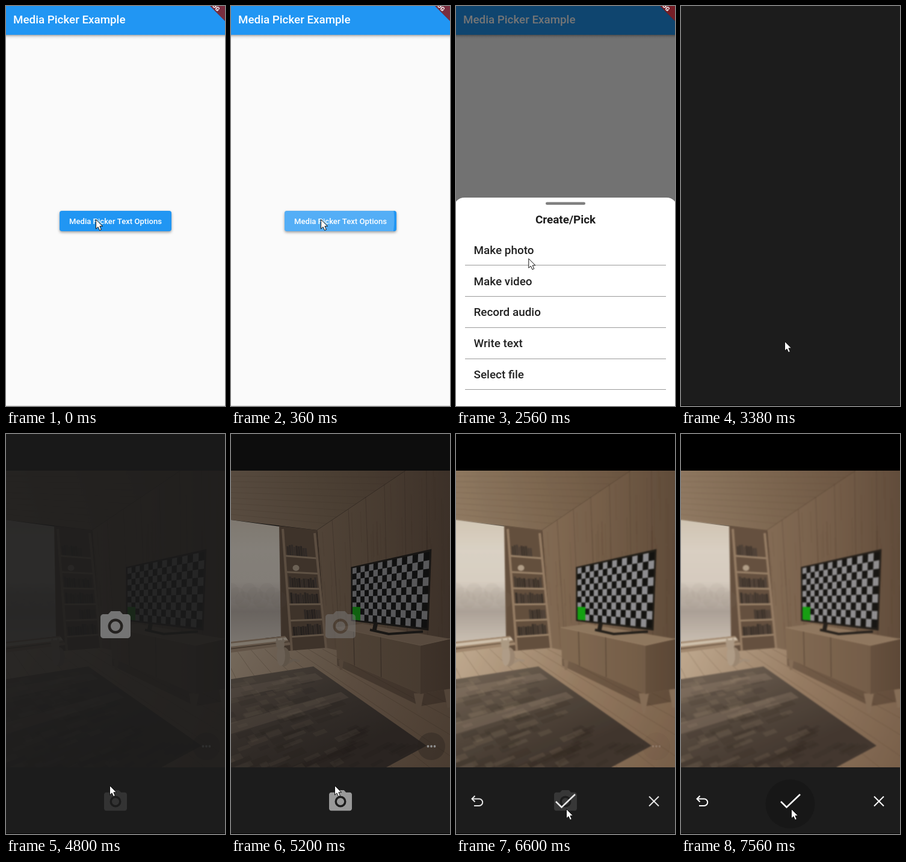
An HTML page with a canvas for the animation above (8 s loop, 364 by 666 pixels).

```html
<!DOCTYPE html>
<html lang="en">
<head>
<meta charset="utf-8">
<title>Media Picker Example</title>
<style>
html, body { margin: 0; width: 100%; height: 100%; overflow: hidden; background: #fafafa; }
canvas { display: block; }
</style>
</head>
<body>
<canvas id="stage" width="364" height="666"></canvas>
<script>
const W = 364, H = 666, LOOP = 8000;
const PHOTO_TOP = 61, PHOTO_BOTTOM = 555, PHOTO_HEIGHT = PHOTO_BOTTOM - PHOTO_TOP;
const stage = document.getElementById('stage').getContext('2d');

const mix = (a, b, p) => a + (b - a) * p;
const ramp = (t, from, to) => Math.min(1, Math.max(0, (t - from) / (to - from)));
const easeOut = p => 1 - (1 - p) ** 2;
const easeInOut = p => p * p * (3 - 2 * p);

function trace(c, points) {
  c.beginPath();
  for (const [x, y] of points) c.lineTo(x, y);
}
function fill(c, color, ...points) {
  trace(c, points);
  c.fillStyle = color;
  c.fill();
}
function line(c, color, width, ...points) {
  trace(c, points);
  c.strokeStyle = color;
  c.lineWidth = width;
  c.stroke();
}
function ellipse(c, color, x, y, rx, ry = rx) {
  c.beginPath();
  c.ellipse(x, y, rx, ry, 0, 0, 7);
  c.fillStyle = color;
  c.fill();
}
function rounded(c, color, x, y, w, h, r) {
  c.beginPath();
  c.roundRect(x, y, w, h, r);
  c.fillStyle = color;
  c.fill();
}
function rect(c, color, x, y, w, h) {
  c.fillStyle = color;
  c.fillRect(x, y, w, h);
}
function gradient(c, x0, y0, x1, y1, ...colors) {
  const g = c.createLinearGradient(x0, y0, x1, y1);
  colors.forEach((color, i) => g.addColorStop(i / (colors.length - 1), color));
  return g;
}
function text(c, str, x, y, size, weight, color, align = 'left') {
  c.font = `${weight} ${size}px Roboto, sans-serif`;
  c.textAlign = align;
  c.fillStyle = color;
  c.fillText(str, x, y);
}
function withAlpha(alpha, draw) {
  if (alpha <= 0) return;
  stage.save();
  stage.globalAlpha = alpha;
  draw();
  stage.restore();
}

// Maps (u, v) in the unit square onto a surface with four corners;
// depth > 1 makes the left side recede.
function plane(tl, tr, br, bl, depth = 1) {
  return (u, v) => {
    const p = u / (depth + (1 - depth) * u);
    return [0, 1].map(k => mix(mix(tl[k], tr[k], p), mix(bl[k], br[k], p), v));
  };
}
function patch(c, color, at, u0 = 0, v0 = 0, u1 = 1, v1 = 1) {
  fill(c, color, at(u0, v0), at(u1, v0), at(u1, v1), at(u0, v1));
}

// The room seen by the camera, painted once
function paintRoom() {
  const canvas = document.createElement('canvas');
  canvas.width = W;
  canvas.height = H;
  const c = canvas.getContext('2d');
  let seed = 11;
  const rnd = (a, b) => (seed = seed * 16807 % 2147483647, a + (b - a) * seed / 2147483647);
  const cornerTop = [143, 160], cornerBottom = [158, 356];
  c.beginPath();
  c.rect(0, PHOTO_TOP, W, PHOTO_HEIGHT);
  c.clip();

  // Floor boards
  rect(c, gradient(c, 0, 360, W, 540, '#c9b196', '#997c62', '#785d47'), 0, 340, W, 220);
  for (let i = 0; i < 10; i++) line(c, 'rgba(65,43,28,.28)', 1, [i * 24 - 40, 358], [i * 62 + 20, 555]);

  // Walls and ceiling, with boards and grain
  const wall = plane(cornerTop, [W, 11], [W, 400], cornerBottom, 1.3);
  const backWall = plane([80, 153], cornerTop, cornerBottom, [84, 362]);
  const ceiling = plane([0, PHOTO_TOP], [290, PHOTO_TOP], cornerTop, [0, 143]);
  patch(c, gradient(c, 143, 0, W, 0, '#846a53', '#735a45', '#5c4635'), wall);
  patch(c, '#604a39', backWall);
  patch(c, gradient(c, 0, 140, 290, 61, '#937b63', '#7d654e', '#674f3c'), ceiling);
  for (let i = 1; i < 7; i++) line(c, 'rgba(45,28,18,.28)', 1, wall(i / 7, 0), wall(i / 7, 1));
  for (let i = 1; i < 9; i++) line(c, 'rgba(60,40,25,.14)', 1, ceiling(0, i / 9), ceiling(1, i / 9));
  for (let i = 0; i < 70; i++) {
    const u = rnd(0, 1), v = rnd(0, .8);
    line(c, 'rgba(50,32,20,.07)', 1.5, wall(u, v), wall(u, v + .2));
  }
  line(c, 'rgba(50,34,22,.35)', 1, ceiling(1, 0), cornerTop, cornerBottom);

  // Window with a hazy view, and its sill
  const pane = plane([0, 143], [81, 154], [84, 337], [0, 346]);
  patch(c, gradient(c, 0, 143, 0, 346, '#ded2c1', '#e8dfd3', '#e5dbd0', '#b3a8a0', '#d5cabe'), pane);
  for (let i = 0; i < 9; i++) ellipse(c, 'rgba(150,138,128,.08)', i * 10, 262 + i % 3 * 7, 13, 14);
  line(c, '#6a5341', 2, pane(1, 0), pane(1, 1));
  const sill = plane(pane(0, 1), pane(1.07, 1), [100, 351], [0, 364]);
  patch(c, '#a68b71', sill);
  patch(c, '#dccdb8', sill, 0, .15, 1, .45);
  patch(c, '#66503d', sill, 0, .6, 1, .7);

  // Rug with streaks of light
  const rug = plane([-200, 439], [137, 387], [325, 519], [-60, 726]);
  patch(c, gradient(c, 60, 395, 130, 555, '#6a5b4e', '#4b3f36', '#382d27'), rug);
  for (let i = 0; i < 170; i++) {
    const u = rnd(.2, .9), v = rnd(0, .95), lit = rnd(0, 1) > v + .1;
    patch(c, lit ? 'rgba(185,160,135,.13)' : 'rgba(25,18,14,.13)', rug, u, v, u + rnd(.03, .1), v + rnd(.02, .05));
  }
  for (const v of [.07, .3]) patch(c, 'rgba(190,166,140,.22)', rug, .3, v, .97, v + .07);

  // Ladder shelf with books
  const shelf = plane([86, 158], [139, 165], cornerBottom, [101, 361]);
  for (let row = 0; row < 6; row++) {
    const v = .22 + row * .133;
    if (row !== 1) {
      const first = row === 4 ? .45 : .08, last = row ? .9 : .68;
      for (let u = first; u < last; u += .07)
        patch(c, `hsl(22 18% ${rnd(15, 25)}%)`, shelf, u, v - rnd(.075, .1), u + .06, v);
    }
    line(c, '#a0866c', 3, shelf(0, v), shelf(1, v));
  }
  ellipse(c, '#b8a48d', 108, 223, 5.5, 5);
  for (const u of [0, 1]) line(c, '#987d64', 4, shelf(u, 0), shelf(u, 1));

  // Cat
  line(c, '#a8937d', 4, [94, 381], [104, 376], [114, 378]);
  ellipse(c, '#a08a74', 88, 371, 10, 16);
  ellipse(c, '#b7a38d', 83, 369, 7, 17);
  ellipse(c, '#b4a08a', 82, 351, 7, 8);
  for (const x of [76, 86]) fill(c, '#b4a08a', [x - 2, 349], [x, 338], [x + 4, 346]);

  // Cabinet
  const front = plane([174, 322], [315, 352], [315, 433], [176, 373]);
  const side = plane(front(1, 0), [W, 341], [W, 424], front(1, 1));
  const top = plane(front(0, 0), [218, 316], side(1, 0), front(1, 0));
  patch(c, 'rgba(45,29,19,.4)', front, 0, 1, 1, 1.25);
  patch(c, 'rgba(45,29,19,.4)', side, 0, 1, 1, 1.25);
  for (const [x, y] of [front(.05, 1), front(.98, 1), side(.95, 1)]) {
    const length = (y - 320) * .3;
    fill(c, '#866c55', [x - length / 4, y], [x + length / 4, y], [x + 2, y + length], [x - 2, y + length]);
  }
  patch(c, '#92785f', top);
  patch(c, gradient(c, 174, 0, 315, 0, '#836951', '#725944'), front);
  patch(c, gradient(c, 315, 0, W, 0, '#624b39', '#574130'), side);
  for (const u of [.21, .53]) line(c, '#493729', 1, front(u, 0), front(u, 1));
  line(c, '#a0856b', 1, front(0, 0), front(1, 0), side(1, 0));

  // Television with a checkerboard
  line(c, '#171310', 7, [241, 313], [238, 328]);
  line(c, '#171310', 4, [231, 326], [262, 333], [319, 329]);
  const screen = plane([202, 223.5], [330, 196], [325.5, 323], [202, 309], 1.22);
  const cols = 16, rows = 9;
  patch(c, '#15110e', screen, -.025, -.03, 1.02, 1.03);
  patch(c, '#060606', screen);
  for (let i = 0; i < cols; i++)
    for (let j = i % 2; j < rows; j += 2)
      patch(c, '#929297', screen, i / cols, j / rows, (i + 1) / cols, (j + 1) / rows);
  patch(c, '#06a606', screen, 0, .75, 2 / cols, 1);
  return canvas;
}
const room = paintRoom();

const cameraIcon = new Path2D('M9 2L7.17 4H4c-1.1 0-2 .9-2 2v12c0 1.1.9 2 2 2h16c1.1 0 2-.9 2-2V6c0-1.1-.9-2-2-2h-3.17L15 2H9z' +
  'M12 17a5 5 0 1 1 0-10a5 5 0 1 1 0 10zM12 15.2a3.2 3.2 0 1 0 0-6.4a3.2 3.2 0 1 0 0 6.4z');
function drawCamera(x, y, scale, color) {
  stage.save();
  stage.translate(x, y);
  stage.scale(scale, scale);
  stage.fillStyle = color;
  stage.fill(cameraIcon, 'evenodd');
  stage.restore();
}

function drawHome(t) {
  const c = stage;
  rect(c, '#fafafa', 0, 0, W, H);
  rect(c, gradient(c, 0, 48, 0, 55, 'rgba(0,0,0,.32)', 'rgba(0,0,0,.08)', 'rgba(0,0,0,0)'), 0, 48, W, 7);
  rect(c, '#2196f3', 0, 0, W, 48);
  text(c, 'Media Picker Example', 12, 29, 18.8, 500, '#fff');

  c.save();
  c.shadowColor = 'rgba(0,0,0,.38)';
  c.shadowBlur = 4;
  c.shadowOffsetY = 2;
  rounded(c, '#2196f3', 89, 341, 186, 34, 4);
  c.restore();
  withAlpha(.24 * ramp(t, 30, 110) * (1 - ramp(t, 350, 560)), () => {
    c.beginPath();
    c.roundRect(89, 341, 186, 34, 4);
    c.clip();
    ellipse(c, '#fff', 149, 356, mix(15, 135, ramp(t, 30, 400)));
  });
  text(c, 'Media Picker Text Options', 182, 362.7, 13.1, 500, '#fff', 'center');
  rect(c, '#dcdcdc', 0, 665, W, 1);
}

function drawSheet(t) {
  const c = stage;
  const open = easeOut(ramp(t, 400, 750)) * (1 - easeInOut(ramp(t, 2650, 2870)));
  if (!open) return;
  rect(c, `rgba(0,0,0,${.54 * open})`, 0, 0, W, H);
  c.save();
  c.translate(0, (1 - open) * 347);
  rounded(c, '#fff', -4, 319, W + 8, 360, 18);
  rounded(c, '#808080', 149, 326.5, 66, 4.5, 2.25);
  text(c, 'Create/Pick', 182, 362.2, 18.9, 700, '#1e1e1e', 'center');
  ['Make photo', 'Make video', 'Record audio', 'Write text', 'Select file'].forEach((label, i) => {
    const y = 431.4 + i * 51.75;
    text(c, label, 29.5, y - 18.6, 18.9, 500, '#212121');
    rect(c, '#9a9a9a', 15, Math.round(y), 334, 1);
  });
  c.restore();
}

function drawBanner() {
  const c = stage;
  for (const color of ['rgba(0,0,0,.5)', 'rgba(183,28,28,.63)']) fill(c, color, [339, 0], [W, 0], [W, 25]);
  c.save();
  c.translate(343, -4);
  c.rotate(Math.PI / 4);
  text(c, 'DEBUG', 0, 3.4, 9.6, 900, '#fff', 'center');
  c.restore();
}

function drawReviewControls(t) {
  const c = stage;
  ellipse(c, `rgba(0,0,0,${.17 * ramp(t, 7000, 7560)})`, 181.5, 616, 41);
  line(c, '#fff', 2.6, [166, 612], [175.5, 621.5], [198, 600]);
  for (const side of [-1, 1]) line(c, '#fff', 2, [329 - 8 * side, 603.5], [329 + 8 * side, 619.5]);
  line(c, '#fff', 2, [31.5, 602.5], [26.5, 607.5], [31.5, 612.5]);
  c.beginPath();
  c.moveTo(27, 607.5);
  c.arc(38.5, 613.2, 5.7, -Math.PI / 2, Math.PI / 2);
  c.lineTo(30, 618.9);
  c.stroke();
}

function drawRoom(review) {
  const c = stage;
  c.drawImage(room, 0, 0);
  withAlpha(review, () => {
    c.beginPath();
    c.rect(0, PHOTO_TOP, W, PHOTO_HEIGHT);
    c.clip();
    c.filter = 'blur(1px)';
    c.drawImage(room, 0, 0);
    c.filter = 'none';
    rect(c, 'rgba(125,115,95,.15)', 0, PHOTO_TOP, W, PHOTO_HEIGHT);
  });
  withAlpha(1 - review, () => {
    ellipse(c, 'rgba(45,35,28,.35)', 333, 520, 23);
    for (const dx of [-5.5, 0, 5.5]) ellipse(c, '#fff', 333 + dx, 520, 1.9);
  });
}

function drawCameraApp(t) {
  const c = stage;
  const review = ramp(t, 6460, 6620);
  rect(c, '#000', 0, 0, W, H);
  if (t >= 4700) drawRoom(review);

  // Cover that dissolves once the preview is ready
  withAlpha(1 - ramp(t, 4700, 5600) ** 1.15, () => {
    rect(c, '#1c1c1c', 0, 0, W, PHOTO_BOTTOM);
    withAlpha(ramp(t, 4290, 4345) * c.globalAlpha, () => drawCamera(152, 290, 2.5, '#7c7c7c'));
  });

  rect(c, '#1c1c1c', 0, PHOTO_BOTTOM, W, 110);
  withAlpha(ramp(t, 6000, 6050) * (1 - ramp(t, 6250, 6430)), () => {
    c.beginPath();
    c.rect(0, PHOTO_BOTTOM, W, 110);
    c.clip();
    ellipse(c, '#22324b', 181.5, 624, mix(20, 212, ramp(t, 6000, 6360)));
  });
  withAlpha(mix(.1 * ramp(t, 3400, 3850), 1, ramp(t, 4800, 5600)) * (1 - review), () =>
    drawCamera(159.2, 589.2, 1.9, '#fff'));
  withAlpha(review, () => drawReviewControls(t));
}

// Each move: start, end, and where the pointer arrives
const moves = [
  [840, 1380, 132, 428], [1520, 1740, 125, 420], [1910, 2150, 119, 413],
  [2540, 3380, 172, 558], [3380, 3850, 172, 585], [5620, 5930, 183, 624]
];
const clicks = [[30, 170], [2330, 2420], [6000, 6230], [7290, 7540]];

function drawCursor(t) {
  const c = stage;
  let x = 149, y = 355;
  for (const [from, to, toX, toY] of moves) {
    const p = ramp(t, from, to);
    x = mix(x, toX, p);
    y = mix(y, toY, easeOut(p));
  }
  if (clicks.some(([from, to]) => t >= from && t < to)) ellipse(c, 'rgba(236,226,30,.75)', x - .5, y, 12);
  c.save();
  c.translate(x, y);
  c.lineJoin = 'round';
  fill(c, '#fff', [.5, .5], [.5, 16], [4, 12.8], [6.6, 18.6], [9.4, 17.3], [6.9, 11.7], [11.6, 11.7]);
  c.closePath();
  c.strokeStyle = '#111';
  c.lineWidth = 1;
  c.stroke();
  c.restore();
}

function render(t) {
  if (t < 3340) {
    drawHome(t);
    drawSheet(t);
    drawBanner();
    withAlpha(easeInOut(ramp(t, 2900, 3320)), () => rect(stage, '#1c1c1c', 0, 0, W, H));
  } else {
    drawCameraApp(t);
  }
  drawCursor(t);
}

const start = performance.now();
function tick() {
  render((performance.now() - start) % LOOP);
  requestAnimationFrame(tick);
}
tick();
</script>
</body>
</html>
```
